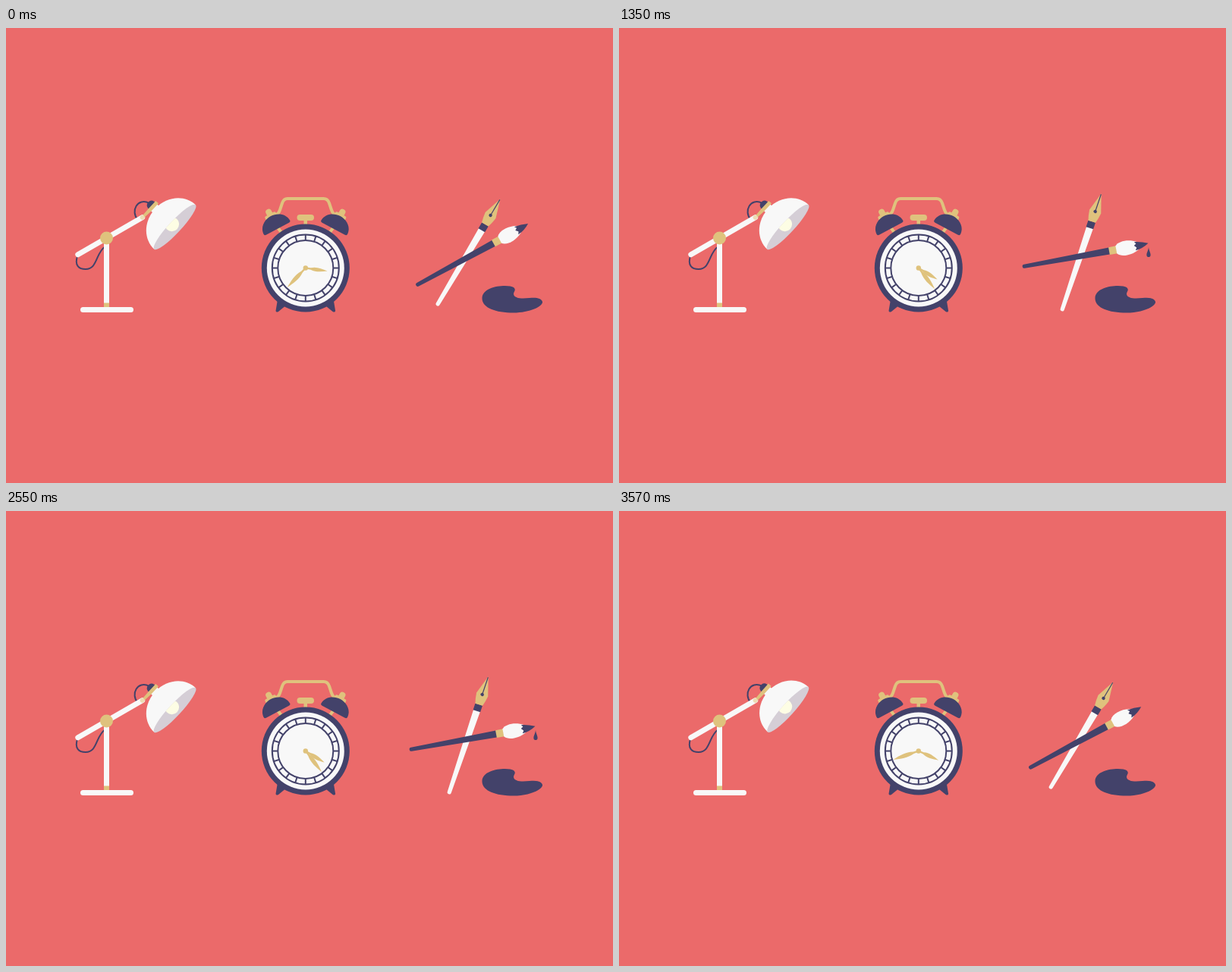
An HTML page for the animation above (3600 ms loop, 800 px wide and 600 px high).

```html
<!DOCTYPE html>
<html lang="en">
<head>
<meta charset="utf-8">
<title>Desk tools</title>
<style>
  html, body { margin: 0; width: 100%; height: 100%; overflow: hidden; background: #eb6a6a; }
  svg { display: block; width: 800px; height: 600px; }
  .navy { fill: #43426a; }
  .gold { fill: #dfc27d; }
  .white { fill: #f8f8f8; }
  .line { fill: none; stroke: #43426a; stroke-width: 2; }
  .goldline { fill: none; stroke: #dfc27d; stroke-width: 4; stroke-linejoin: round; }
</style>
</head>
<body>
<svg viewBox="0 0 800 600">
  <defs>
    <clipPath id="mouth"><ellipse cx="40" cy="-20" rx="8" ry="40"/></clipPath>
    <g id="bell">
      <path class="goldline" d="M358 263L364 271"/>
      <g transform="translate(357 263) rotate(-28)">
        <rect class="gold" x="-4" y="-27" width="8" height="12" rx="4"/>
        <rect class="gold" x="-8" y="-20" width="16" height="6" rx="2"/>
        <path class="navy" d="M-19.5 0C-19.5-11-9-17 0-17S19.5-11 19.5 0Q19.5 2 17 2H-17Q-19.5 2-19.5 0Z"/>
      </g>
      <path class="navy" d="M358 358L355.5 373Q356 375.5 359 374L370 365Z"/>
    </g>
  </defs>

  <g id="lamp">
    <path id="lowCord" class="line"/>
    <path id="topCord" class="line"/>
    <rect class="white" x="129" y="277" width="7" height="92"/>
    <rect class="gold" x="129" y="362.5" width="7" height="6"/>
    <rect class="white" x="98" y="368" width="70" height="7" rx="3.5"/>
    <g id="arm">
      <path d="M-43.5 0H54.5" stroke="#f8f8f8" stroke-width="7" stroke-linecap="round"/>
    </g>
    <circle class="gold" cx="132.5" cy="277" r="8.5"/>
    <g id="head">
      <path class="navy" d="M0-26H-3Q-8-25-8-20T-3-14H0Z"/>
      <rect class="white" x="1" y="-26" width="7" height="12"/>
      <path class="gold" d="M-2-28H3V-14L2 0H-1.5L-2-14Z"/>
      <circle cx="0" cy="0" r="3" fill="#ecdcb4"/>
      <path class="white" d="M40-60C20-60 4.5-42 4.5-20S20 20 40 20Z"/>
      <g clip-path="url(#mouth)">
        <rect x="30" y="-62" width="20" height="84" fill="#d5ced6"/>
        <circle cx="34.5" cy="-20" r="9.5" fill="#fdfde4"/>
      </g>
    </g>
  </g>

  <g id="clock">
    <path class="goldline" d="M353 248Q359 246 361 240L364 231Q366 225 371 225H418.6Q424 225 426 231L429 240Q431 246 437 248"/>
    <use href="#bell"/>
    <use href="#bell" transform="translate(789.6 0) scale(-1 1)"/>
    <rect class="gold" x="383.5" y="246" width="22.5" height="8" rx="4"/>
    <rect class="gold" x="392.5" y="252" width="4.5" height="8"/>
    <g transform="translate(394.8 316.5)">
      <circle class="navy" r="58"/>
      <circle class="white" r="51"/>
      <circle class="line" r="44"/>
      <circle class="line" r="36.5"/>
      <g id="ticks"></g>
      <path id="longHand" class="gold" d="M-1 0L-1.2-7C-4.2-17-2.2-25 0-35C2.2-25 4.2-17 1.2-7L1 0Z"/>
      <path id="shortHand" class="gold" d="M-1 0L-1.2-7C-4-14-2-21 0-29C2-21 4-14 1.2-7L1 0Z"/>
      <circle class="gold" r="3.2"/>
    </g>
  </g>

  <g id="tools">
    <path id="drop" class="navy" d="M0 0C.5 5 2.6 7 2.6 10.2A2.6 2.8 0 0 1-2.6 10.2C-2.6 7-.5 5 0 0Z"/>
    <path class="navy" d="M707 361C706 356 698 355 690 356C680 357 670 357 669 351C669 347 673 346 669 342C663 338 627 339 627.5 357C628 369 645 375.5 669 375.5C690 375.5 708 367 707 361Z"/>
    <g id="pen">
      <path class="white" d="M-4.6-35H4.6L2.6 79A2.6 2.6 0 0 1-2.6 79Z"/>
      <rect class="navy" x="-5" y="-43" width="10" height="9"/>
      <path class="gold" d="M0-82L8-57Q7-49 5-43H-5Q-7-49-8-57Z"/>
      <path class="line" style="stroke-width:1.2" d="M0-81V-57"/>
      <circle class="navy" cy="-57" r="2.2"/>
    </g>
    <g id="brush">
      <path class="navy" d="M35-4.6V4.6L-80 2.6A2.6 2.6 0 0 1-80-2.6Z"/>
      <rect class="gold" x="33.5" y="-5" width="10" height="10"/>
      <path class="white" d="M43-5C48-11 62-11 72-5V5C62 11 48 11 43 5Z"/>
      <path class="navy" d="M86-1Q77-5 68-6L70-3L67-1L70 2L68 5.5Q78 4.5 86-1Z"/>
    </g>
  </g>
</svg>

<script>
  const $ = id => document.getElementById(id);
  const CYCLE = 1200, BEAT = 300, STEP = 30;
  const PIVOT = [132.5, 277];

  // Tracks are [time, value] keys; the last key lies one period after the first.
  const armKeys = [[0, 30], [160, 30], [240, 29], [410, 54], [540, 52.8], [780, 51.2], [900, 51.2], [1100, 29.5], [1165, 30], [1200, 30]];
  const headKeys = [[0, 43], [220, 43], [400, 43], [580, 64], [840, -4], [900, -3], [1110, 44], [1165, 42], [1200, 43]];
  const handKeys = [[369, 1], [1080, 1], [1210, 0.923], [1569, 2]];
  const brushKeys = [[0, 28.6], [125, 9], [280, 28.6], [300, 28.6]];

  const mix = (a, b, k) => a + (b - a) * k;
  const smooth = k => (1 - Math.cos(Math.PI * k)) / 2;
  const wrap = (t, n) => ((t % n) + n) % n;

  function track(keys, t) {
    const start = keys[0][0];
    const now = start + wrap(t - start, keys[keys.length - 1][0] - start);
    const i = keys.findIndex(k => k[0] > now);
    const [t0, a] = keys[i - 1], [t1, b] = keys[i];
    return mix(a, b, smooth((now - t0) / (t1 - t0)));
  }

  function turn([x, y], deg) {
    const r = deg * Math.PI / 180, c = Math.cos(r), s = Math.sin(r);
    return [x * c - y * s, x * s + y * c];
  }
  const add = (a, b) => [a[0] + b[0], a[1] + b[1]];
  const place = (id, [x, y], deg = 0) =>
    $(id).setAttribute('transform', `translate(${x} ${y}) rotate(${deg})`);

  $('ticks').innerHTML = Array.from({ length: 20 }, (_, i) =>
    `<path class="line" d="M0-37V-44" transform="rotate(${i * 18})"/>`).join('');

  function drawLamp(t) {
    const arm = track(armKeys, t), head = track(headKeys, t);
    const joint = add(PIVOT, turn([54.5, 0], -arm));
    const end = add(PIVOT, turn([-43.5, 0], -arm));
    place('arm', PIVOT, -arm);
    place('head', joint, head);

    const k = (arm - 30) / 22;
    const p = (a, b, c, d) => `${mix(a, c, k)} ${mix(b, d, k)} `;
    $('lowCord').setAttribute('d', `M${end} C` +
      p(89, 314, 98, 319) + p(97, 318, 101, 330) + p(105, 318, 113, 330) + 'C' +
      p(121, 318, 133, 330) + p(118, 296, 121, 304) + '131 288');

    const from = add(joint, turn([-6, -20], head));
    const bend = add(joint, turn([-23, -15], head));
    $('topCord').setAttribute('d',
      `M${from} C${bend} ${add(joint, [-16, -8])} ${add(joint, [-6, 3])}`);
  }

  function drawClock(t) {
    const ringing = t > 390 && t < 990;
    place('clock', [0, ringing ? 4.2 * (1 - Math.cos((t - 390) / 60 * Math.PI)) : 0]);
    const turns = track(handKeys, t);
    place('longHand', [0, 0], turns * 1800);
    place('shortHand', [0, 0], 180 + turns * 1080);
  }

  function drawTools(t) {
    const b = t % BEAT;
    const pen = b < 172 ? mix(30.7, 14.8, (b / 172) ** 2)
      : mix(14.8, 30.7, smooth(Math.min(1, (b - 172) / 103)));
    place('pen', [609.5, 296], pen);
    place('brush', [613, 300], -track(brushKeys, b));
    place('drop', [698, 289 + (b - 150) * 0.65]);
    $('drop').style.display = b >= 145 && b < 258 ? '' : 'none';
  }

  function draw(now) {
    const t = Math.floor(now / STEP) * STEP % CYCLE;
    drawLamp(t);
    drawClock(t);
    drawTools(t);
  }

  const begin = performance.now();
  (function loop() {
    draw(performance.now() - begin);
    requestAnimationFrame(loop);
  })();
</script>
</body>
</html>
```
